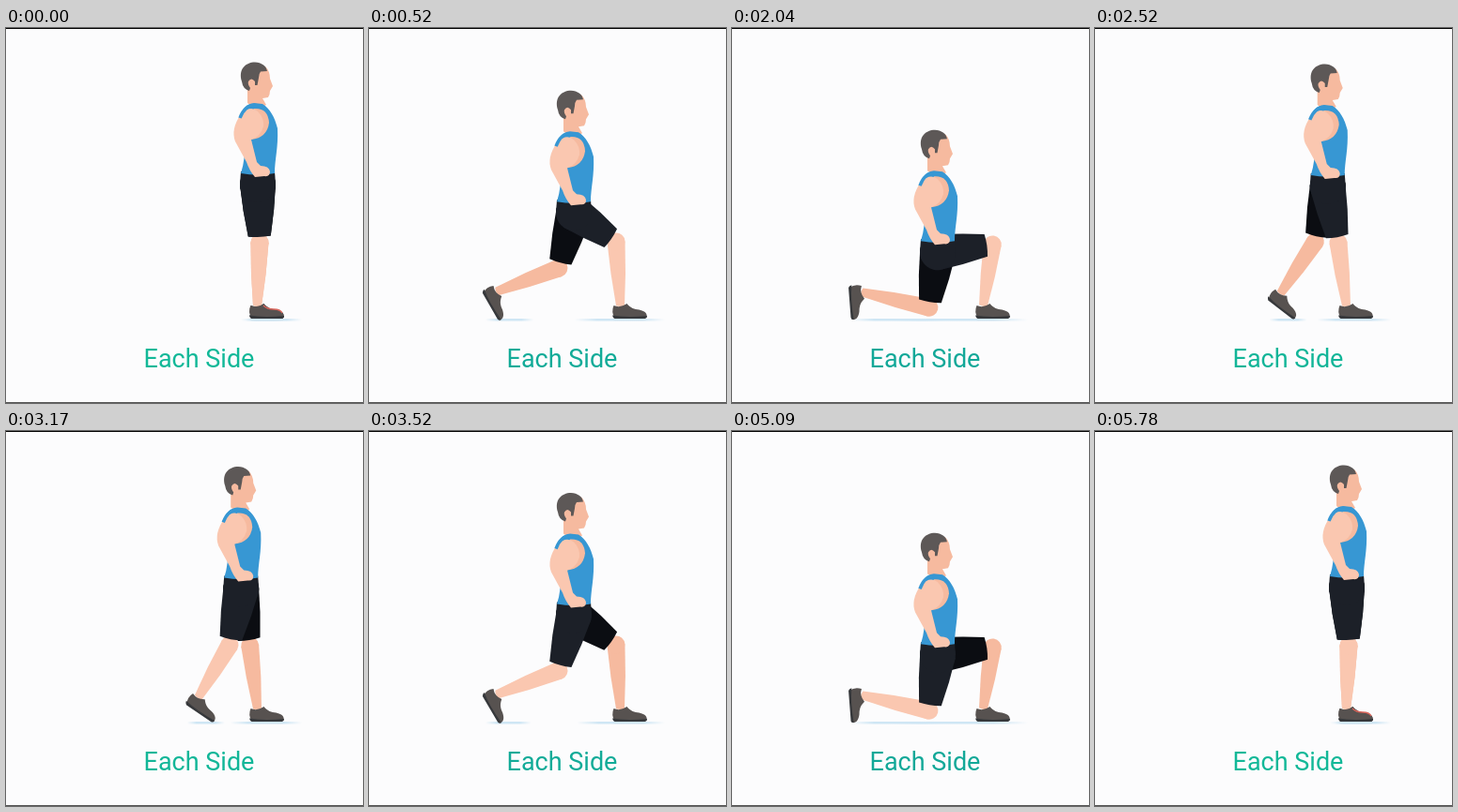
An HTML page with a canvas that plays this animation: 380x400 px, repeating every 5.82 s.

```html
<!DOCTYPE html>
<html lang="en">
<head>
<meta charset="utf-8">
<title>Lunge</title>
<style>
html, body { margin: 0; width: 100%; height: 100%; overflow: hidden; background: #fcfcfd; }
canvas { display: block; }
</style>
</head>
<body>
<canvas id="stage" width="380" height="400"></canvas>
<script>
const ctx = document.getElementById('stage').getContext('2d');
const LOOP = 5820;
const HAIR = '#5d5857', BLUE = '#3797d3', SHOE = '#575250', SOLE = '#36383b';
const NEAR = { skin: '#fac7b0', shorts: '#1c2028' };
const FAR = { skin: '#f6ba9f', shorts: '#0b0d12' };

// Depth of the lunge: 0 is standing, 1 is the lowest pose.
const DEPTHS = [0, 0.175, 0.835, 1];
const POSES = {
  bodyX: [0, -20.5, -50, -49],
  bodyY: [0, 2, 30, 73],
  frontKneeX: [270, 259, 263, 277.5],
  frontKneeY: [229, 229, 228, 231],
  backKneeX: [270, 234, 202, 210],
  backKneeY: [229, 228, 256, 299],
  backAnkleX: [267.5, 197, 136, 138.5],
  backAnkleY: [296, 283, 281, 282],
  backTilt: [0, 38, 60, 86]
};

const clamp = v => Math.max(0, Math.min(1, v));
const ease = (t, start, length) => {
  const u = clamp((t - start) / length);
  return u * u * (3 - 2 * u);
};

// Monotone cubic through the key poses.
function along(values, p) {
  const x = DEPTHS;
  const secant = i => (values[i + 1] - values[i]) / (x[i + 1] - x[i]);
  const slope = i => {
    if (i === 0) return secant(0);
    if (i === x.length - 1) return secant(i - 1);
    const a = secant(i - 1), b = secant(i);
    return a * b > 0 ? 2 * a * b / (a + b) : 0;
  };
  let i = 0;
  while (i < x.length - 2 && p > x[i + 1]) i++;
  const h = x[i + 1] - x[i], u = (p - x[i]) / h, v = 1 - u;
  return v * v * (1 + 2 * u) * values[i] + u * u * (3 - 2 * u) * values[i + 1] +
    u * v * h * (v * slope(i) - u * slope(i + 1));
}

function fill(path, color) {
  ctx.fillStyle = color;
  ctx.fill(new Path2D(path));
}

function line(path, width, color) {
  ctx.strokeStyle = color;
  ctx.lineWidth = width;
  ctx.stroke(new Path2D(path));
}

function disc(x, y, r, color) {
  ctx.fillStyle = color;
  ctx.beginPath();
  ctx.arc(x, y, r, 0, 7);
  ctx.fill();
}

function taper(a, b, ra, rb, color, trim = 0) {
  const length = Math.hypot(b.x - a.x, b.y - a.y);
  ctx.save();
  ctx.translate(a.x, a.y);
  ctx.rotate(Math.atan2(b.y - a.y, b.x - a.x));
  const end = length - trim, mid = (ra + rb) / 2 + 1.5;
  fill(`M0 ${-ra}Q${end / 2} ${-mid} ${end} ${-rb}Q${end + 2} 0 ${end} ${rb}Q${end / 2} ${mid} 0 ${ra}Z`, color);
  disc(0, 0, ra, color);
  ctx.restore();
}

function shoe(ankle, tilt) {
  ctx.save();
  ctx.translate(ankle.x, ankle.y);
  ctx.rotate(tilt * Math.PI / 180);
  fill('M-7 0Q0 3 7 -2C11 3 15 4 20 4.5C27 6 29 9 28 13L-6 13Q-10 7 -7 0Z', SHOE);
  fill('M-8.5 10.5Q6 13 28.5 11Q28 14 26 14L-6 14Q-8 13 -8.5 10.5Z', SOLE);
  ctx.restore();
}

function leg(hip, { knee, ankle, tilt }, tone) {
  taper(knee, ankle, 9.5, 4.5, tone.skin);
  shoe(ankle, tilt);
  taper(hip, knee, 19, 12, tone.shorts, 7);
}

function upperBody() {
  // Neck, face and hair.
  fill('M257 56L257 80Q267 89 277 82L273 75L279 74Q281 71 281 67L284 62L281 54Q281 46 276 41L262 42Z', FAR.skin);
  fill('M251 57C247 44 255 36.5 265 36.5C272 37 277 40 278 46L271 46.5Q269 49 269 53L267.5 61L265 61L265 57Q261 52 258 57Q257 60 260 64L259 67Q252 65 251 57Z', HAIR);
  // Vest, armhole and arm.
  fill('M249 97Q252 81 264 80L273 81C281 86 286 95 289 107C290 128 286 140 286 155Q268 158 250 155Q255 140 254 120Z', BLUE);
  fill('M264 86Q279 85 280 101Q278 117 261 119L252 105Z', FAR.skin);
  fill('M250 92Q260 82 268 89Q275 96 274 105Q271 116 261 119L267 143L271 147Q280 147 281 153Q281 159 275 158L265 159Q259 152 256 143L244 121Q239 108 250 92Z', NEAR.skin);
  line('M249 96Q254 82.5 264 82.5Q272 82 277 88', 3.5, BLUE);
}

function shadow(left, right) {
  const g = ctx.createLinearGradient(left, 0, right, 0);
  g.addColorStop(0, '#cfe6f400');
  g.addColorStop(0.25, '#cfe6f4');
  g.addColorStop(0.75, '#cfe6f4');
  g.addColorStop(1, '#cfe6f400');
  ctx.fillStyle = g;
  ctx.fillRect(left, 310, right - left, 2.5);
}

function draw(t) {
  const p = t < 2020 ? ease(t, 0, 700)
    : t < 3005 ? 1 - ease(t, 2020, 680)
    : t < 5070 ? ease(t, 3005, 700)
    : 1 - ease(t, 5070, 700);
  const pose = {};
  for (const key in POSES) pose[key] = along(POSES[key], p);

  ctx.fillStyle = '#fcfcfd';
  ctx.fillRect(0, 0, 380, 400);
  ctx.fillStyle = '#000';
  ctx.fillRect(0, 0, 380, 1);
  ctx.fillStyle = '#555';
  ctx.fillRect(0, 399, 380, 1);

  const spread = clamp((p - 0.8) / 0.2);
  shadow(250 - 20 * clamp(p * 4) - 60 * spread, 315);
  shadow(pose.backAnkleX - 12, pose.backAnkleX + 28 + 60 * spread);

  const hip = { x: 268 + pose.bodyX, y: 167 + pose.bodyY };
  const front = {
    knee: { x: pose.frontKneeX, y: pose.frontKneeY },
    ankle: { x: 267.5, y: 296 },
    tilt: 0
  };
  const back = {
    knee: { x: pose.backKneeX, y: pose.backKneeY },
    ankle: { x: pose.backAnkleX, y: pose.backAnkleY },
    tilt: pose.backTilt
  };
  const farSteps = t < 2850;
  leg(hip, farSteps ? back : front, FAR);
  leg(hip, farSteps ? front : back, NEAR);
  if (p < 0.04) line('M274 296Q278 300 285 300T294 304', 1.3, '#d8645a');

  ctx.save();
  ctx.translate(pose.bodyX, pose.bodyY);
  fill('M250 153L286 153L287 167L249 167Z', NEAR.shorts);
  upperBody();
  ctx.restore();

  ctx.fillStyle = `rgb(18, ${Math.round(184 - 16 * p)}, 152)`;
  ctx.font = '27px Roboto, sans-serif';
  ctx.textAlign = 'center';
  ctx.fillText('Each Side', 205.5, 362);
}

function tick() {
  draw(performance.now() % LOOP);
  requestAnimationFrame(tick);
}
tick();
</script>
</body>
</html>
```
